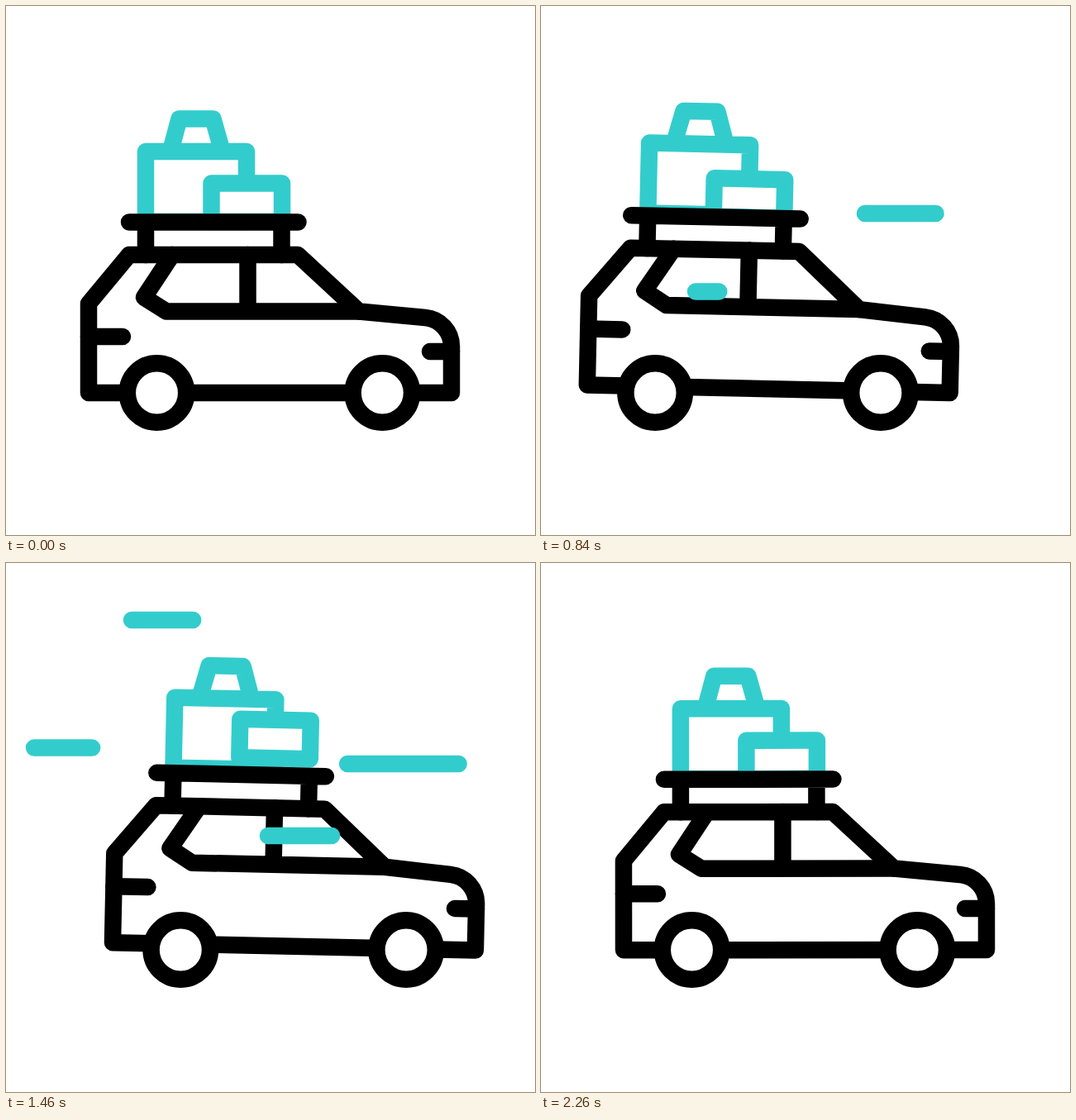
These frames come from a looping animation (640x640 px, 2.4 s). An HTML page:

```html
<!DOCTYPE html>
<html lang="en">
<head>
<meta charset="utf-8">
<title>Road trip</title>
<style>
  html, body { margin: 0; width: 100%; height: 100%; overflow: hidden; background: #fff; }
  svg { display: block; width: 100%; height: 100%; }
  g { stroke-width: 20.5; stroke-linecap: round; stroke-linejoin: round; fill: none; }
  .teal { stroke: #33cccc; }
  .black { stroke: #000; }
  .solid { fill: #fff; }
</style>
</head>
<body>
<svg viewBox="0 0 640 640">
  <g id="body">
    <g class="teal">
      <path id="suitcase" d="M169 176H291V261H169ZM200 172L209.500 136.500H250.500L260.500 172"/>
      <path id="box" class="solid" d="M248.500 214.500H334V261H248.500Z"/>
    </g>
    <g class="black">
      <path d="M149 261.500H353.500M169 262V301M333.500 262V301"/>
      <path d="M100 468V360L149 301H353L427 369.500L507 377A35 35 0 0 1 539 412V468Z"/>
      <path d="M201 301L167 352.500L194 369.500H427M292.500 301V369.500M100 400H141M513 418H539"/>
    </g>
  </g>
  <g id="wheels" class="black solid">
    <circle cx="182.500" cy="468" r="35.700"/>
    <circle cx="455.300" cy="468" r="35.700"/>
  </g>
  <g class="teal"><path id="wind"/></g>
</svg>
<script>
const LOOP = 2400, SET_OFF = 130;
const WHEELBASE = 439;
const HEAD_TIME = 560, TAIL_DELAY = 290, TAIL_TIME = 500;

// Streaks of wind: each is drawn from the right, then wiped away
const streaks = [
  { y: 207, right: 262, length: 220, start: 30 },
  { y: 92, right: 444, length: 126, start: 50 },
  { y: 345.5, right: 399, length: 212, start: 170 },
  { y: 251, right: 589, length: 197, start: 280 },
  { y: 69, right: 389, length: 237, start: 860 },
  { y: 223.5, right: 248, length: 214, start: 865 },
  { y: 330, right: 542, length: 225, start: 870 },
  { y: 243, right: 558, length: 200, start: 1098 }
];

const clamp = p => Math.min(1, Math.max(0, p));
const ease = p => (1 - Math.cos(Math.PI * clamp(p))) / 2;

// Swings from one extreme to the next in equal steps of time
const sway = (t, step, extremes) => extremes.slice(1).reduce(
  (sum, next, i) => sum + (next - extremes[i]) * ease((t - SET_OFF) / step - i), 0);

// Rises to a height and falls back
const hop = (t, from, to, height) => height * Math.sin(Math.PI * clamp((t - from) / (to - from)));

function streakPath(t, { y, right, length, start }) {
  const head = ease((t - start) / HEAD_TIME);
  const tail = ease((t - start - TAIL_DELAY) / TAIL_TIME);
  return head > tail ? `M${right - length * tail} ${y}H${right - length * head}` : "";
}

const set = (id, name, value) => document.getElementById(id).setAttribute(name, value);
const move = (id, x, y, rest = "") => set(id, "transform", `translate(${x} ${y}) ${rest}`);

function draw(t) {
  const x = sway(t, 625, [0, -48, 30, 0]);
  const rear = sway(t, 360, [0, 12, -9.5, 14.5, -15, 12.5, 0]);
  const front = hop(t, 1450, 1870, 7);
  const tilt = (front - rear) / WHEELBASE * 180 / Math.PI;
  move("body", x, front, `rotate(${tilt} 539 473)`);
  move("wheels", x, 0);
  move("suitcase", 0, -hop(t, 680, 1930, 6.5));
  move("box", 0, -hop(t, 850, 1930, 20.5));
  set("wind", "d", streaks.map(streak => streakPath(t, streak)).join(""));
}

const begin = performance.now();
function frame() {
  draw((performance.now() - begin) % LOOP);
  requestAnimationFrame(frame);
}
frame();
</script>
</body>
</html>
```
